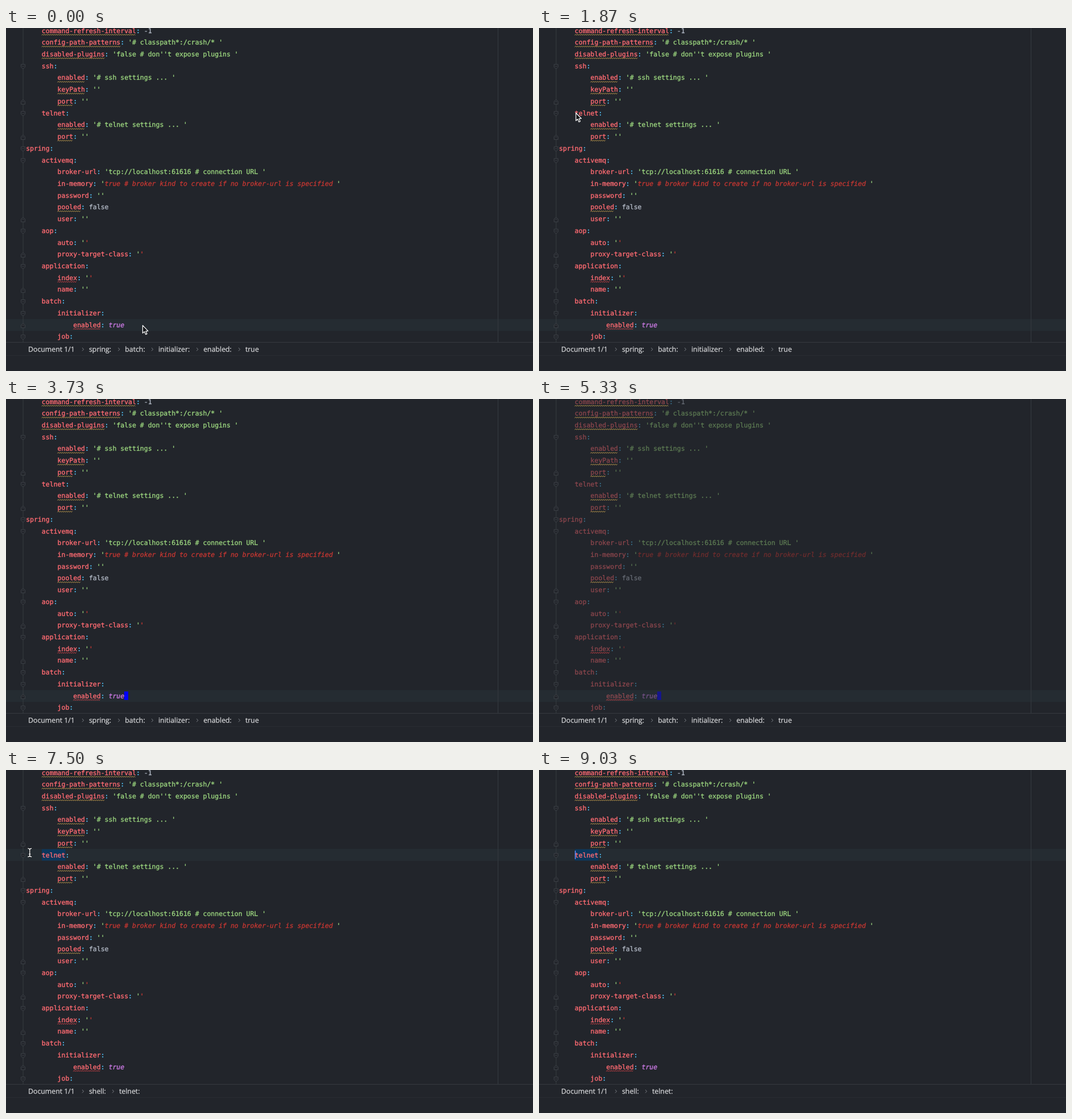
Write an HTML page with a canvas that moves like this. It is 927x604 px and loops after 9310 ms.

```html
<!DOCTYPE html>
<html lang="en">
<head>
<meta charset="utf-8">
<title>Editor jump</title>
<style>
  html, body { margin: 0; width: 100%; height: 100%; overflow: hidden; background: #22252b; }
  canvas { display: block; width: 927px; height: 604px; }
</style>
</head>
<body>
<canvas id="stage"></canvas>
<script>
const W = 927, H = 604, LOOP = 9310;
const LEFT = 35.2, CHAR = 6.918, ROW = 20.72, FIRST = 5.1;
const MONO = '"DejaVu Sans Mono", monospace';
const SANS = '"Open Sans", "Noto Sans", sans-serif';
const BG = '#22252b';
const COLORS = {
  k: '#ff6b72', c: '#4fbdf0', g: '#9ad47e',
  n: '#b0b7c3', e: '#cc3a35', i: '#c23732', p: '#cb7ae4'
};

// [indent, underline mark, key, value]; each value part starts with its style letter
const LINES = [
  [1, '~', 'command-refresh-interval', 'n-1'],
  [1, '~', 'config-path-patterns', "g'# classpath*:/crash/* '"],
  [1, '~', 'disabled-plugins', "g'false # don''t expose plugins '"],
  [1, '', 'ssh', ''],
  [2, '~', 'enabled', "g'# ssh settings ... '"],
  [2, '~', 'keyPath', "g''"],
  [2, '~', 'port', "g''"],
  [1, '', 'telnet', ''],
  [2, '~', 'enabled', "g'# telnet settings ... '"],
  [2, '~', 'port', "g''"],
  [0, '', 'spring', ''],
  [1, '', 'activemq', ''],
  [2, '', 'broker-url', "g'tcp://localhost:61616 # connection URL '"],
  [2, '', 'in-memory', "g'|itrue # broker kind to create if no broker-url is specified |g'"],
  [2, '', 'password', "g''"],
  [2, '~', 'pooled', 'nfalse'],
  [2, '', 'user', "g''"],
  [1, '', 'aop', ''],
  [2, '', 'auto', "g'|e'"],
  [2, '', 'proxy-target-class', "g'|e'"],
  [1, '', 'application', ''],
  [2, '!', 'index', "g'|e'"],
  [2, '', 'name', "g''"],
  [1, '', 'batch', ''],
  [2, '', 'initializer', ''],
  [3, '!', 'enabled', 'ptrue'],
  [2, '', 'job', '']
];
const FOLD_OPEN = [3, 7, 10, 11, 17, 20, 23, 24, 26];
const FOLD_END = [6, 9, 16, 19, 22, 25];

// jump labels: [row, column of the match, label]
const TAGS_T = [[7, 4, 'AA'], [8, 20, 'SS'], [12, 21, 'DD'], [13, 20, 'FF'],
  [13, 39, 'GG'], [19, 14, 'HH'], [25, 21, 'JJ']];
const TAGS_A = [[11, 4, 'BB'], [17, 4, 'YY'], [18, 8, 'EE'], [20, 4, 'WW']];

const CRUMBS_START = [['Document 1/1', 39], ['spring:', 146], ['batch:', 209.3],
  ['initializer:', 268], ['enabled:', 347.2], ['true', 421]];
const CRUMBS_END = [['Document 1/1', 39], ['shell:', 146], ['telnet:', 199]];

// [time, x, y]
const ARROW_PATH = [[0, 240, 523], [370, 240, 523], [560, 226, 507], [830, 218.5, 514],
  [1070, 218.5, 514], [1170, 223, 511], [1400, 168, 360], [1640, 90, 196],
  [1870, 64.5, 149], [2000, 69, 137], [2230, 73, 121], [2450, 82, 148], [2670, 84, 167]];
const BEAM_PATH = [[7000, 84, 167], [7200, 60, 159], [7400, 39, 148], [7500, 41.7, 145.5],
  [7620, 48, 138], [7900, 109, 108], [8000, 109, 108], [8250, 300, 58], [8470, 523, -4]];

const canvas = document.getElementById('stage');
const ctx = canvas.getContext('2d');
const scale = window.devicePixelRatio || 1;
canvas.width = Math.round(W * scale);
canvas.height = Math.round(H * scale);

const colX = col => LEFT + col * CHAR;
const rowY = row => FIRST + row * ROW;
const baseline = row => rowY(row) + 3.5;
const within = (t, from, to) => t >= from && t < to;

function rect(color, x, y, w, h) {
  ctx.fillStyle = color;
  ctx.fillRect(x, y, w, h);
}

function polyline(points, close) {
  ctx.beginPath();
  points.forEach(([x, y]) => ctx.lineTo(x, y));
  if (close) ctx.closePath();
}

function pill(color, x, y, w, h, r) {
  ctx.fillStyle = color;
  ctx.beginPath();
  ctx.roundRect(x, y, w, h, r);
  ctx.fill();
}

function pointAt(path, t) {
  const next = path.findIndex(p => p[0] > t);
  if (next < 0) return path[path.length - 1].slice(1);
  if (next === 0) return path[0].slice(1);
  const a = path[next - 1], b = path[next];
  const u = (t - a[0]) / (b[0] - a[0]);
  return [a[1] + (b[1] - a[1]) * u, a[2] + (b[2] - a[2]) * u];
}

// Thin outline thickens the glyphs like desktop font smoothing.
function glyphs(text, x, y, color, weight) {
  ctx.fillStyle = ctx.strokeStyle = color;
  ctx.lineWidth = weight;
  ctx.fillText(text, x, y);
  ctx.strokeText(text, x, y);
}

// Places every glyph on the column grid and returns the next column.
function mono(text, col, row, style) {
  const slant = style === 'i' || style === 'p' ? 'italic ' : '';
  ctx.font = slant + '11.5px ' + MONO;
  for (const ch of text) {
    if (ch !== ' ') glyphs(ch, colX(col), baseline(row), COLORS[style], 0.35);
    col++;
  }
  return col;
}

function wave(col, length, row, color) {
  const start = colX(col), end = colX(col + length), y = rowY(row) + 6.8;
  const points = [];
  for (let x = start, k = 0; x <= end; x += 1.75, k++) points.push([x, y + (k % 2 ? -0.9 : 0.9)]);
  polyline(points);
  ctx.strokeStyle = color;
  ctx.lineWidth = 0.9;
  ctx.stroke();
}

function drawCode(dim) {
  LINES.forEach(([indent, mark, key, value], row) => {
    const start = indent * 4;
    ctx.globalAlpha = dim ? 0.4 : 1;
    let col = mono(key, start, row, 'k');
    col = mono(':', col, row, 'c') + 1;
    if (value) value.split('|').forEach(part => {
      col = mono(part.slice(1), col, row, part[0]);
    });
    ctx.globalAlpha = 1;
    if (mark) wave(start, key.length, row, mark === '!' ? '#e5444a' : '#cfa851');
  });
}

function foldIcon(row, dir) {
  const y = rowY(row) + 0.8;
  const shape = [[26.5, y - 4 * dir], [33.5, y - 4 * dir], [33.5, y + dir], [30, y + 4 * dir], [26.5, y + dir]];
  polyline(shape, true);
  ctx.fillStyle = BG;
  ctx.fill();
  ctx.strokeStyle = '#40444a';
  ctx.lineWidth = 0.9;
  ctx.stroke();
  rect('#40444a', 28.3, y - 1, 3.4, 0.9);
}

function drawGutter() {
  rect('#383c42', 29.6, 0, 1, 553);
  FOLD_OPEN.forEach(row => foldIcon(row, 1));
  FOLD_END.forEach(row => foldIcon(row, -1));
  rect('#363a40', 865, 0, 1, 553);
}

function drawTags(tags) {
  for (const [row, col, label] of tags) {
    const x = colX(col), y = rowY(row) - 7.3;
    pill('#287a28', x, y, CHAR + 0.4, 14.6, 3);
    pill('#ffff00', x - 2 * CHAR - 0.4, y, 2 * CHAR + 1, 14.6, 3.5);
    ctx.font = 'bold 11.5px ' + MONO;
    ctx.fillStyle = '#111';
    [...label].forEach((ch, k) => ctx.fillText(ch, x + (k - 2) * CHAR, baseline(row)));
  }
}

function drawCrumbs(items) {
  rect(BG, 0, 553, W, 51);
  rect('#363a40', 0, 553, W, 1);
  rect('#292c32', 0, 576, W, 1);
  ctx.font = '12.3px ' + SANS;
  items.forEach(([text, x], k) => {
    glyphs(text, x, 569.7, '#d6d7d9', 0.25);
    if (!k) return;
    polyline([[x - 12, 563], [x - 9.4, 565.8], [x - 12, 568.6]]);
    ctx.strokeStyle = '#7d8187';
    ctx.lineWidth = 1;
    ctx.stroke();
  });
}

function drawCaret(t, jumped) {
  if (jumped) {
    if (t >= 7000 && t % 1000 < 500) rect('#5c8cff', 63, 142, 1.5, 15);
    return;
  }
  const on = within(t, 130, 600) || within(t, 1070, 1570) || within(t, 2070, 2570) || within(t, 3100, 3600);
  if (on) rect('#5c8cff', 208.6, 515, 1.5, 15);
}

function drawArrow([x, y]) {
  const shape = [[0.4, 0.6], [0.4, 14.4], [3.4, 11.6], [5.7, 16.6], [8, 15.6], [5.8, 10.8], [9.9, 10.6]];
  polyline(shape.map(([dx, dy]) => [x + dx, y + dy]), true);
  ctx.fillStyle = '#15171a';
  ctx.fill();
  ctx.strokeStyle = '#fff';
  ctx.lineWidth = 1.2;
  ctx.stroke();
}

function drawBeam([x, y]) {
  for (const [color, width] of [['#15171a', 2.8], ['#fff', 1.3]]) {
    ctx.strokeStyle = color;
    ctx.lineWidth = width;
    ctx.beginPath();
    for (const s of [-1, 1]) {
      ctx.moveTo(x - 3.4, y + 7.3 * s);
      ctx.quadraticCurveTo(x, y + 7.3 * s, x, y + 5 * s);
      ctx.quadraticCurveTo(x, y + 7.3 * s, x + 3.4, y + 7.3 * s);
    }
    ctx.moveTo(x, y - 5.5);
    ctx.lineTo(x, y + 5.5);
    ctx.moveTo(x - 1.6, y + 2.6);
    ctx.lineTo(x + 1.6, y + 2.6);
    ctx.stroke();
  }
}

function draw(t) {
  const jumped = t >= 6670;
  const dim = within(t, 5330, 6500);
  ctx.setTransform(scale, 0, 0, scale, 0, 0);
  ctx.textRendering = 'geometricPrecision';
  ctx.lineJoin = 'round';
  rect(BG, 0, 0, W, H);
  rect('#252c32', 0, jumped ? 139 : 512.5, W, 21);
  if (jumped) rect('#0c375c', 63, 139.5, 41.5, 20);
  drawGutter();
  drawCode(dim);
  if (within(t, 3700, 6500)) rect(dim ? '#15158c' : '#0000ff', 208, 515, 7, 15);
  if (within(t, 5400, 6370)) drawTags(TAGS_T);
  if (within(t, 6370, 6440)) drawTags(TAGS_A);
  drawCaret(t, jumped);
  drawCrumbs(jumped ? CRUMBS_END : CRUMBS_START);
  if (t < 3600) drawArrow(pointAt(ARROW_PATH, t));
  if (within(t, 7000, 8500)) drawBeam(pointAt(BEAM_PATH, t));
}

const begin = performance.now();
function tick() {
  draw((performance.now() - begin) % LOOP);
  requestAnimationFrame(tick);
}
tick();
</script>
</body>
</html>
```
